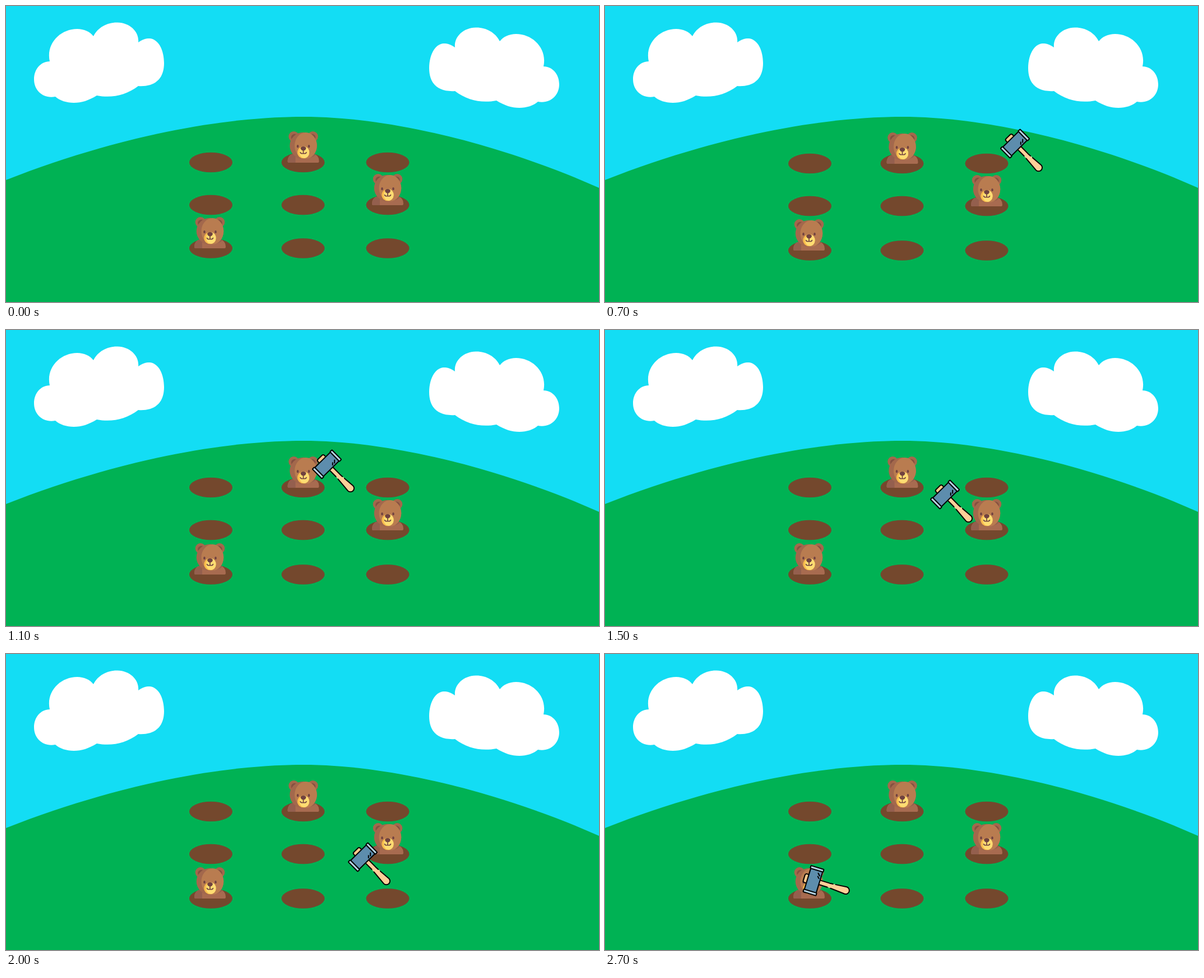
An HTML page that plays this animation: 1058 px wide and 529 px high, repeating every 2.8 s.

```html
<!DOCTYPE html>
<html lang="en">
<head>
<meta charset="utf-8">
<title>Whack a bear</title>
<style>
  html, body { margin: 0; width: 100%; height: 100%; overflow: hidden; background: #13ddf4; }
  svg { display: block; width: 100%; height: 100%; }
</style>
</head>
<body>
<svg viewBox="0 0 1058 529">
  <defs>
    <path id="cloud" fill="#fff" d="M78 99C71 67 97 41 127 41C139 41 150 46 156 54C164 38 181 29 199 29.5C222 30 238 47 236 65C244 59 252 57.5 257 58C273 60 282 80 282 102C282 130 266 145 236 143C214 160 188 165 162 160C147 169 135 173 121 173C108 173 96 169 88 162C66 166 50 151 50 131C50 113 62 99 78 99Z"/>

    <!-- origin: middle of the flat bottom edge -->
    <g id="bear">
      <g fill="#a3684c"><circle cx="-17" cy="-46.7" r="9.3"/><circle cx="17" cy="-46.7" r="9.3"/></g>
      <g fill="#855041"><circle cx="-15.5" cy="-45" r="6.2"/><circle cx="15.5" cy="-45" r="6.2"/></g>
      <path fill="#a86b50" d="M-26 0Q-28 0-28-3Q-28-14-17-16H17Q28-14 28-3Q28 0 26 0Z"/>
      <path fill="#945f4e" d="M-26 0Q-28 0-28-3Q-27-14-17-16H17L22-14Q16-8 0-7Q-9-7-14-11V0Z"/>
      <ellipse cy="-30.5" rx="24.3" ry="23.8" fill="#a3684c"/>
      <ellipse cx="4.4" cy="-30.5" rx="19.9" ry="23.5" fill="#b97c50"/>
      <circle cy="-18.3" r="10.6" fill="#f9bd4c"/>
      <ellipse cx="1.8" cy="-18.3" rx="8.8" ry="10.4" fill="#ffdc72"/>
      <g fill="#704240">
        <ellipse cx="-10" cy="-29.3" rx="1.8" ry="2.6"/>
        <ellipse cx="10" cy="-29.3" rx="1.8" ry="2.6"/>
        <path d="M-5-26Q-4-29 0-29T5-26Q4-21.5 0-21.5T-5-26Z"/>
      </g>
      <path fill="none" stroke="#704240" stroke-width="1.7" stroke-linecap="round" d="M0-22V-17M-5.5-18.5Q-4.5-15.5 0-16.5Q4.5-15.5 5.5-18.5"/>
    </g>
  </defs>

  <rect width="1058" height="529" fill="#13ddf4"/>
  <use href="#cloud"/>
  <use href="#cloud" transform="translate(1037 9) scale(-1 1)"/>
  <path fill="#00b254" d="M0 311C180 240 370 198 530 198C690 198 890 250 1058 325V529H0Z"/>
  <g id="holes" fill="#74482d"></g>
  <g id="bears"></g>

  <!-- origin: centre of the head, handle pointing down -->
  <g id="hammer" stroke="#000" stroke-width="2" stroke-linejoin="round" stroke-linecap="round">
    <rect x="-8" y="-17.5" width="16" height="9" rx="3" fill="#ffc98c"/>
    <path fill="#ffcf98" stroke="none" d="M-4 11V30L-6.5 60A6.5 6.5 0 0 0 6.5 60L4 30V11Z"/>
    <path fill="none" d="M-4 11V27M-4.3 33L-6.5 60A6.5 6.5 0 0 0 6.5 60L4.8 40M4.4 35L4 29V11"/>
    <rect x="-20" y="-11" width="40" height="22" fill="#5d8dad"/>
    <g fill="#b5d3e2">
      <rect x="-24.5" y="-12" width="5" height="24" rx="1"/>
      <rect x="19.5" y="-12" width="5" height="24" rx="1"/>
    </g>
    <path fill="none" d="M6.5 8L9.3 5.2M11.3 8L15 4.3"/>
  </g>
</svg>
<script>
  const LOOP = 2800, STEP = 100;
  const REST = -44.5, HIT = -73;
  const columns = [365.5, 530, 681];
  const rows = [{ y: 279.5, drop: 2 }, { y: 355.5, drop: 2 }, { y: 433, drop: 4 }];
  const bearSpots = [[530.5, 280, 0], [681, 356, 1], [364, 433, 2]];

  // step, x, y, angle of the hammer
  const path = [
    [1, 948.5, 356, REST], [3, 879.5, 316, REST], [4, 879.5, 316, REST],
    [7, 731.5, 246, REST], [10, 615.5, 237, REST], [11, 572.5, 240, REST],
    [12, 545.5, 243, REST], [13, 539, 251, HIT], [14, 568, 280, REST],
    [15, 606.5, 294, REST], [17, 682.5, 322, REST], [18, 689, 326, HIT],
    [19, 676, 352, REST], [20, 636.5, 363, REST], [22, 557.5, 384, REST],
    [23, 514.5, 390, REST], [26, 375.5, 399, REST], [27, 372, 405, HIT]
  ];

  const find = id => document.getElementById(id);
  const hammer = find("hammer");

  function add(parent, name, attributes) {
    const node = document.createElementNS("http://www.w3.org/2000/svg", name);
    for (const key in attributes) node.setAttribute(key, attributes[key]);
    return parent.appendChild(node);
  }

  const holeRows = rows.map(({ y }) => {
    const group = add(find("holes"), "g", {});
    columns.forEach(cx => add(group, "ellipse", { cx, cy: y, rx: 38.5, ry: 17.8 }));
    return group;
  });
  const bears = bearSpots.map(([x, y]) => add(find("bears"), "use", { href: "#bear", x, y }));

  function poseAt(step) {
    const next = path.findIndex(key => key[0] >= step);
    const b = path[next], a = path[Math.max(0, next - 1)];
    const k = b === a ? 0 : (step - a[0]) / (b[0] - a[0]);
    return a.map((value, i) => value + (b[i] - value) * k);
  }

  function draw(time) {
    const step = Math.floor((time % LOOP) / STEP);
    const started = step > 0;
    const shift = row => `translate(0 ${started ? rows[row].drop : 0})`;
    holeRows.forEach((group, row) => group.setAttribute("transform", shift(row)));
    bears.forEach((bear, i) => bear.setAttribute("transform", shift(bearSpots[i][2])));
    hammer.setAttribute("visibility", started ? "visible" : "hidden");
    if (started) {
      const [, x, y, angle] = poseAt(step);
      hammer.setAttribute("transform", `translate(${x} ${y}) rotate(${angle})`);
    }
  }

  const start = performance.now();
  function tick() {
    draw(performance.now() - start);
    requestAnimationFrame(tick);
  }
  tick();
</script>
</body>
</html>
```
